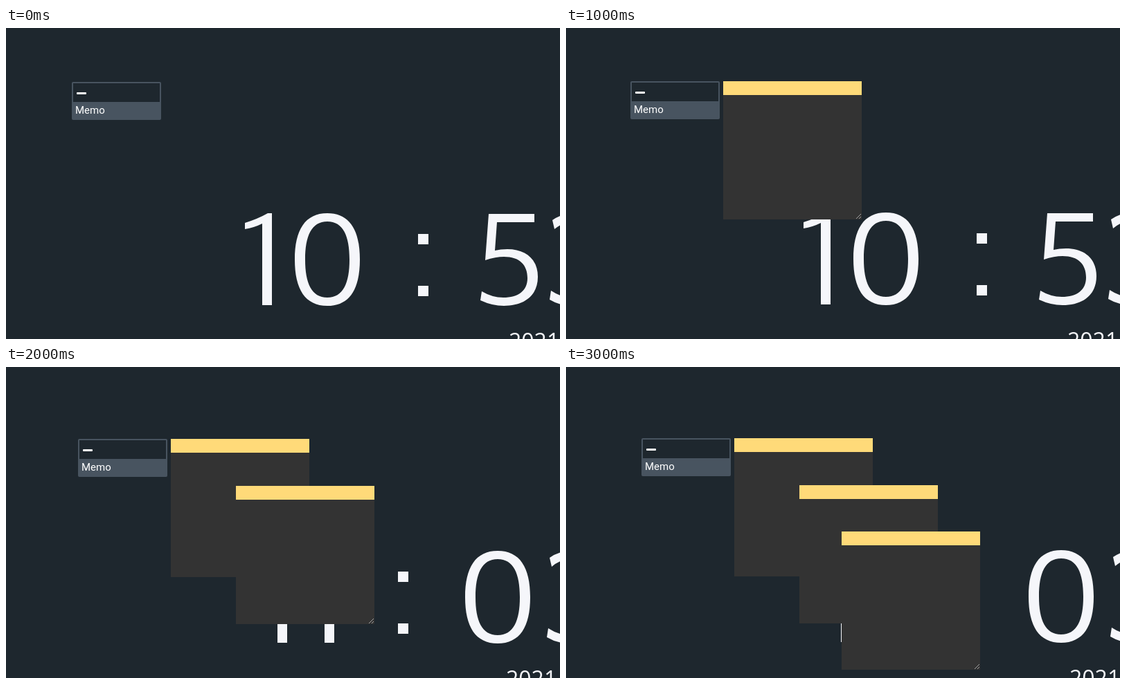
An HTML page for the animation above (4000 ms loop, 800 px wide and 450 px high).

```html
<!DOCTYPE html>
<html lang="en">
<head>
<meta charset="utf-8">
<title>Clock and memos</title>
<style>
  html, body { margin: 0; width: 100%; height: 100%; overflow: hidden; background: #1e272e; }
  svg { display: block; width: 800px; height: 450px; }
</style>
</head>
<body>
<svg viewBox="0 0 800 450">
  <defs>
    <path id="one" d="M0 401V283Q-12 289-25 291V282Q-6 276 8 268H14V401Z"/>
    <path id="zero" fill-rule="evenodd" d="M47 268C79 268 94 292 94 335S79 402 47 402S0 378 0 335S15 268 47 268Z
      M47 280C24 280 15 301 15 335S24 390 47 390S79 369 79 335S70 280 47 280Z"/>
    <path id="five" d="M763 269H697L692 336Q707 331 719 331C742 331 753 343 753 362C753 380 740 390 718 390
      Q702 390 687 381L685 394Q702 402 719 402C750 402 768 386 768 360C768 335 751 320 724 320Q714 320 706 322L709 281H763Z"/>
    <path id="three" d="M789 278Q803 268 822 268C852 268 862 285 862 300C862 318 850 329 836 332C852 335 867 345 867 364
      C867 388 848 402 818 402Q800 402 785 393L787 380Q802 390 818 390C840 390 851 379 851 364C851 346 835 338 812 338
      V326C835 326 847 317 847 302C847 287 836 280 820 280Q805 280 792 291Z"/>
    <path id="colon" d="M0 298h15v15h-15zM0 373h15v15h-15z"/>
    <g id="memo">
      <rect width="200" height="200" fill="#333"/>
      <rect width="200" height="20" fill="#ffda79"/>
      <path d="M192 199l7-7M196 199l3-3" stroke="#b0b0b0" stroke-width=".9"/>
    </g>
  </defs>

  <g id="clock" fill="#f5f6fa">
    <g class="time" role="img" aria-label="10 : 53">
      <use href="#one" x="370"/>
      <use href="#zero" x="417"/>
      <use href="#colon" x="595"/>
      <use href="#five"/>
    </g>
    <g class="time" role="img" aria-label="11 : 03">
      <use href="#one" x="396"/>
      <use href="#one" x="464"/>
      <use href="#colon" x="570"/>
      <use href="#zero" x="667"/>
    </g>
    <use href="#three"/>
    <text x="726" y="465" font-size="32" font-family="'Open Sans', 'Noto Sans', sans-serif">2021</text>
  </g>

  <g id="desk">
    <rect width="129" height="55" rx="2" fill="#485460"/>
    <rect x="2" y="2" width="125" height="27" fill="#1e272e"/>
    <rect x="7" y="15" width="14" height="3" rx="1" fill="#fff"/>
    <text x="5" y="46" font-size="15" fill="#fff" font-family="Roboto, sans-serif">Memo</text>
    <use class="memo" href="#memo" x="134" y="0"/>
    <use class="memo" href="#memo" x="228" y="68"/>
    <use class="memo" href="#memo" x="289" y="135"/>
  </g>
</svg>
<script>
  const clock = document.getElementById('clock');
  const desk = document.getElementById('desk');
  const times = document.querySelectorAll('.time');
  const memos = document.querySelectorAll('.memo');

  // One entry per second: desk position, clock shift, which time is shown
  const steps = [
    { desk: [95, 78], clock: [0, 0], time: 0 },
    { desk: [93, 77], clock: [-2, -1], time: 0 },
    { desk: [104, 104], clock: [-4, -2], time: 1 },
    { desk: [109, 103], clock: [1, -3], time: 1 }
  ];

  const move = (el, pos) => el.setAttribute('transform', `translate(${pos})`);
  const show = (el, on) => el.setAttribute('display', on ? 'inline' : 'none');

  function draw(ms) {
    const count = Math.floor(ms % 4000 / 1000);
    const step = steps[count];
    move(desk, step.desk);
    move(clock, step.clock);
    times.forEach((el, i) => show(el, i === step.time));
    memos.forEach((el, i) => show(el, i < count));
  }

  const start = performance.now();
  function tick() {
    draw(performance.now() - start);
    requestAnimationFrame(tick);
  }
  tick();
</script>
</body>
</html>
```
